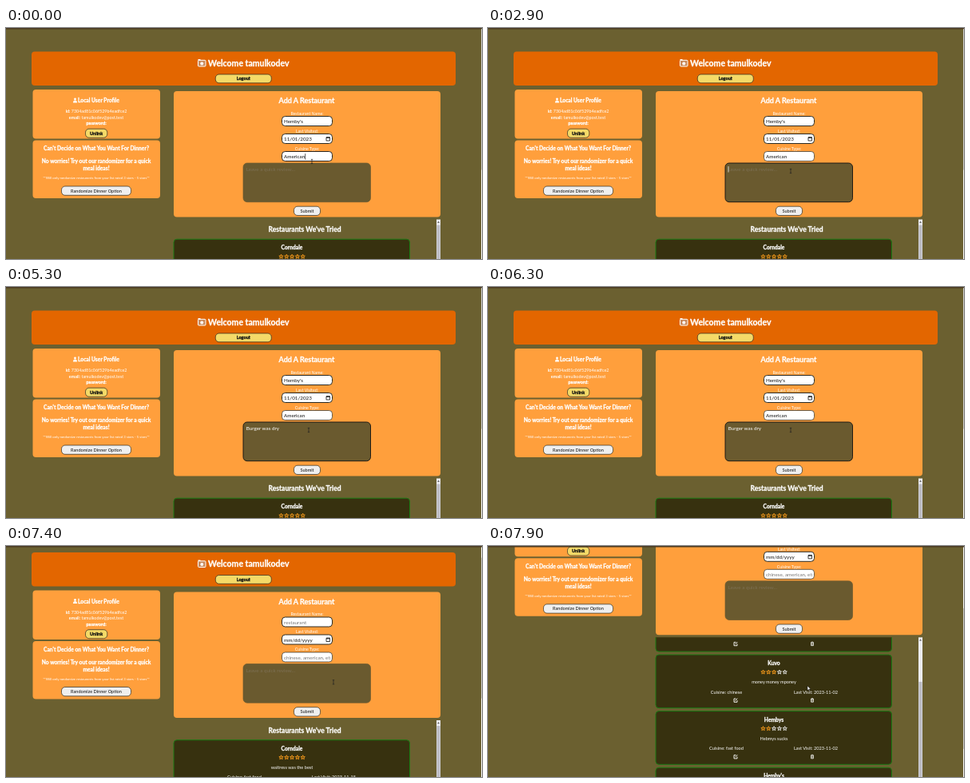
Recreate the animation shown at these times as an HTML page. Size 596 by 289 pixels, loop 8 s.

```html
<!DOCTYPE html>
<html lang="en">
<head>
<meta charset="utf-8">
<title>Restaurant diary</title>
<style>
  html, body { margin: 0; width: 100%; height: 100%; overflow: hidden; background: #6b6030; }
  svg { display: block; width: 596px; height: 289px; }
  text { font-family: Lato, sans-serif; white-space: pre; }
</style>
</head>
<body>
<svg id="stage" viewBox="0 0 596 289"></svg>
<script>
const LOOP = 8000, STEP = 100;
const ORANGE = '#ff9f3c', YELLOW = '#f4da68', GREY = '#efefef', EDGE = '#2a2a22';

const box = (x, y, w, h, fill, stroke = 'none', r = 4, extra = 'stroke-width=".7"') =>
  `<rect x="${x}" y="${y}" width="${w}" height="${h}" rx="${r}" fill="${fill}" stroke="${stroke}" ${extra}/>`;

const text = (x, y, s, size = 5.6, { fill = '#fff', weight = 400, anchor = 'middle', extra = '' } = {}) =>
  `<text x="${x}" y="${y}" font-size="${size}" fill="${fill}" font-weight="${weight}" text-anchor="${anchor}" ${extra}>${s}</text>`;

// A thin outline in the text colour gives the heavy, rounded look.
const bold = (x, y, s, size, { fill = '#fff', ...more } = {}) =>
  text(x, y, s, size, { fill, weight: 700, extra: `stroke="${fill}" stroke-width=".3" stroke-linejoin="round"`, ...more });

const button = (x, y, w, h, label, fill, draw = text) =>
  box(x, y, w, h, fill, EDGE, 4.5) + draw(x + w / 2, y + h / 2 + 2, label, 5.6, { fill: '#111' });

const field = (id, y, label) =>
  text(377, y - 1.7, label, 5.25) + box(345.5, y, 63, 12, '#fff', EDGE, 4, `id="${id}Box"`) +
  text(348, y + 8.7, '', 6.3, { anchor: 'start', extra: `id="${id}" clip-path="url(#fieldClip)"` });

function star(cx, cy, color) {
  const points = Array.from({ length: 10 }, (_, i) => {
    const a = i * Math.PI / 5, r = i % 2 ? 1.3 : 2.8;
    return `${(cx + r * Math.sin(a)).toFixed(2)},${(cy - r * Math.cos(a)).toFixed(2)}`;
  });
  return `<polygon points="${points.join(' ')}" fill="${color}" fill-opacity=".3" stroke="${color}" stroke-width=".8"/>`;
}

function card(index, name, stars, comment, cuisine, date) {
  const y = 264.2 + index * 70.6;
  const rating = [0, 1, 2, 3, 4].map(i => star(344.5 + i * 6.8, y + 21.8, i < stars ? '#ff9f1c' : '#eee'));
  return box(210, y, 295.5, 66.7, '#37310f', '#1c7a14', 4, 'stroke-width="1"') +
    bold(358, y + 13.2, name, 6.7) + rating.join('') +
    text(358, y + 36, comment) + text(298.5, y + 48.6, 'Cuisine: ' + cuisine) +
    text(410.5, y + 48.6, 'Last Visit: ' + date) +
    `<path transform="translate(310 ${y + 57})" d="M.5-2H-2V2.3H2V0M-.6.7 2.3-2.3" fill="none" stroke="#fff" stroke-width=".9"/>` +
    `<path transform="translate(406 ${y + 57})" d="M-2-1.6H2M-.8-2.3H.8M-1.4-1.4V2.2H1.4V-1.4M0-.8V1.5" fill="none" stroke="#fff" stroke-width=".8"/>`;
}

const header = box(32, 29.5, 531, 42.5, '#e36600') +
  box(240.5, 40.3, 9.5, 7.7, '#c98a5c', '#fff', 1, 'stroke-width="1"') + box(240.5, 39, 3, 1.5, '#fff', 'none', 0) +
  '<circle cx="245.3" cy="44.4" r="2" fill="#fff"/>' +
  bold(253, 47.7, 'Welcome tamulkodev', 10.5, { anchor: 'start' }) +
  button(262.3, 58, 70, 10.8, 'Logout', YELLOW, bold);

const profile = box(33.5, 77, 159.5, 61.5, ORANGE) +
  '<circle cx="86.5" cy="89" r="1.4" fill="#fff"/><path d="M84 93.5q0-3 2.5-3t2.5 3z" fill="#fff"/>' +
  bold(90, 93, 'Local User Profile', 6.7, { anchor: 'start' }) +
  text(113, 106, '<tspan font-weight="700">id:</tspan> 7304ad81c06f529b4eadfce2', 5.4) +
  text(113, 113.7, '<tspan font-weight="700">email:</tspan> tamulkodev@post.test', 5.4) +
  bold(113, 121, 'password:', 5.6) + button(99.5, 126.2, 27.3, 11, 'Unlink', YELLOW, bold);

const randomizer = box(33.5, 140.5, 159.5, 72.5, ORANGE) +
  bold(113, 153, "Can't Decide on What You Want For Dinner?", 6.7) +
  bold(113, 169, 'No worries! Try out our randomizer for a quick', 6.7) +
  bold(113, 178, 'meal ideas!', 6.7) +
  text(113, 189, '**Will only randomize restaurants from your list rated 3 stars - 5 stars**', 4.3) +
  button(69.5, 198, 87, 11.3, 'Randomize Dinner Option', GREY);

const form = box(210, 79, 334, 157.5, ORANGE) + bold(376.5, 94, 'Add A Restaurant', 9) +
  field('place', 110.5, 'Restaurant Name:') + field('date', 132.5, 'Last Visited:') + field('cuisine', 154.5, 'Cuisine Type:') +
  '<path d="M401 136.8h4.5v4.2H401zM401 137.4h4.5M402.2 136v1M404.4 136v1" fill="none" stroke="#111" stroke-width=".8"/>' +
  box(297, 169, 159.5, 48.7, '#6a5a2f', '', 5, 'id="reviewBox"') +
  text(300.7, 179, '', 6.3, { anchor: 'start', extra: 'id="review"' }) +
  '<path id="caret" d="M0-6V1.5" stroke-width=".7"/>' +
  button(360.5, 223.2, 33, 11.3, 'Submit', GREY);

const list = '<g clip-path="url(#listClip)"><g id="list">' +
  bold(374, 255.2, "Restaurants We've Tried", 8.5) +
  card(0, 'Corndale', 5, 'waitress was the best', 'fast food', '2023-11-15') +
  card(1, 'Kuvo', 3, 'money money mponey', 'chinese', '2023-11-02') +
  card(2, 'Hembys', 2, 'Hebmys sucks', 'fast food', '2023-11-02') +
  card(3, "Hemby's", 0, 'Burger was dry', 'American', '2023-11-01') + '</g></g>' +
  box(539, 239.5, 5, 190, '#ececf2', 'none', 0) + box(539.4, 246.5, 4.2, 146, '#bcbcc4', 'none', 0, 'id="thumb"') +
  '<path d="M540 243.8h3l-1.5-2z" fill="#555"/>';

stage.innerHTML = `<defs>
  <clipPath id="listClip"><rect x="200" y="239.5" width="340" height="300"/></clipPath>
  <clipPath id="fieldClip"><rect x="347" y="100" width="59.5" height="80"/></clipPath></defs>
  <g id="page">${header + profile + randomizer + form + list}</g>` +
  box(0, 0, 596, 1.5, '#4a3a22', 'none', 0) + box(595, 1.5, 1, 288, '#fafafa', 'none', 0) +
  box(595, 1.5, 1, 176, '#cfcfcf', 'none', 0, 'id="pageThumb"') +
  '<path id="beam" d="M-1.2-2.6H1.2M0-2.6V2.6M-1.2 2.6H1.2" stroke="#222" stroke-width=".7"/>' +
  '<path id="arrow" d="M0 0V5.6L1.3 4.4 2.2 6.3 3 5.9 2.2 4.1H4z" fill="#fff" stroke="#111" stroke-width=".5"/>';

const $ = id => document.getElementById(id);
const move = (id, x, y) => $(id).setAttribute('transform', `translate(${x} ${y})`);
const show = (id, on) => $(id).setAttribute('visibility', on ? 'visible' : 'hidden');

// Each key is [time, value]; values between keys are linear.
function track(keys, t) {
  const i = keys.findIndex(k => k[0] > t);
  if (i < 0) return keys.at(-1)[1];
  if (!i) return keys[0][1];
  const [t0, a] = keys[i - 1], [t1, b] = keys[i];
  return a + (b - a) * (t - t0) / (t1 - t0);
}

const mouseX = [[1300, 383], [1900, 379], [6500, 379], [6900, 378], [7000, 378], [7300, 410], [7400, 410], [7500, 407], [7600, 407], [7900, 400]];
const mouseY = [[1300, 167], [1900, 179], [6500, 179], [6900, 229], [7000, 229], [7300, 171], [7600, 169], [7900, 175]];
const pageScroll = [[7300, 0], [7400, 21.5], [7500, 124.5], [7600, 125.2]];
const listScroll = [[7500, 0], [7600, 8], [7700, 34], [7800, 62], [7900, 73.6]];
const REVIEW = 'Burger was dry', FOCUS = 1900, SUBMIT = 7000;
const keyTimes = [37, 39, 41, 42, 43, 43, 44, 44, 45, 46, 47, 47, 48, 49].map(n => n * 100);
const caretOn = [[0, 500], [1000, 1500], [1900, 2400], [2900, 3400], [3700, 5300], [5800, 6300], [6800, SUBMIT]];

function setText(id, value, fill) {
  $(id).textContent = value;
  $(id).setAttribute('fill', fill);
}

function setFocus(id, on, idle) {
  $(id).setAttribute('stroke', on ? '#111' : idle);
  $(id).setAttribute('stroke-width', on ? .9 : .7);
}

function draw(t) {
  const sent = t >= SUBMIT, inReview = t >= FOCUS && !sent;
  const typed = REVIEW.slice(0, keyTimes.filter(k => k <= t).length);
  const ink = sent ? '#777' : '#111';
  setText('place', sent ? 'restaurant' : "Hemby's", ink);
  setText('date', sent ? 'mm/dd/yyyy' : '11/01/2023', '#111');
  setText('cuisine', sent ? 'chinese, american, etc' : 'American', ink);
  const filled = typed && !sent;
  setText('review', filled ? typed : 'Leave a quick review...', filled ? '#fff' : '#7d7054');
  setFocus('cuisineBox', t < FOCUS, EDGE);
  setFocus('reviewBox', inReview, '#6a5a2f');

  const caretX = inReview ? 301 + (typed ? $('review').getComputedTextLength() : 0)
                          : 348.5 + $('cuisine').getComputedTextLength();
  move('caret', caretX, inReview ? 179 : 163.2);
  $('caret').setAttribute('stroke', inReview ? '#fff' : '#111');
  show('caret', caretOn.some(([a, b]) => t >= a && t < b));

  const scrolled = track(listScroll, t), pageY = track(pageScroll, t);
  move('page', 0, -pageY);
  move('pageThumb', 0, pageY * 0.61);
  move('list', 0, -scrolled);
  move('thumb', 0, scrolled * 0.66);

  const x = track(mouseX, t), y = track(mouseY, t), beam = t <= 7400 && y < 218;
  move('beam', x, y);
  move('arrow', x, y);
  show('beam', beam);
  show('arrow', !beam);
}

const start = performance.now();
function tick() {
  const t = (performance.now() - start) % LOOP;
  draw(Math.floor(t / STEP) * STEP);
  requestAnimationFrame(tick);
}
tick();
</script>
</body>
</html>
```
